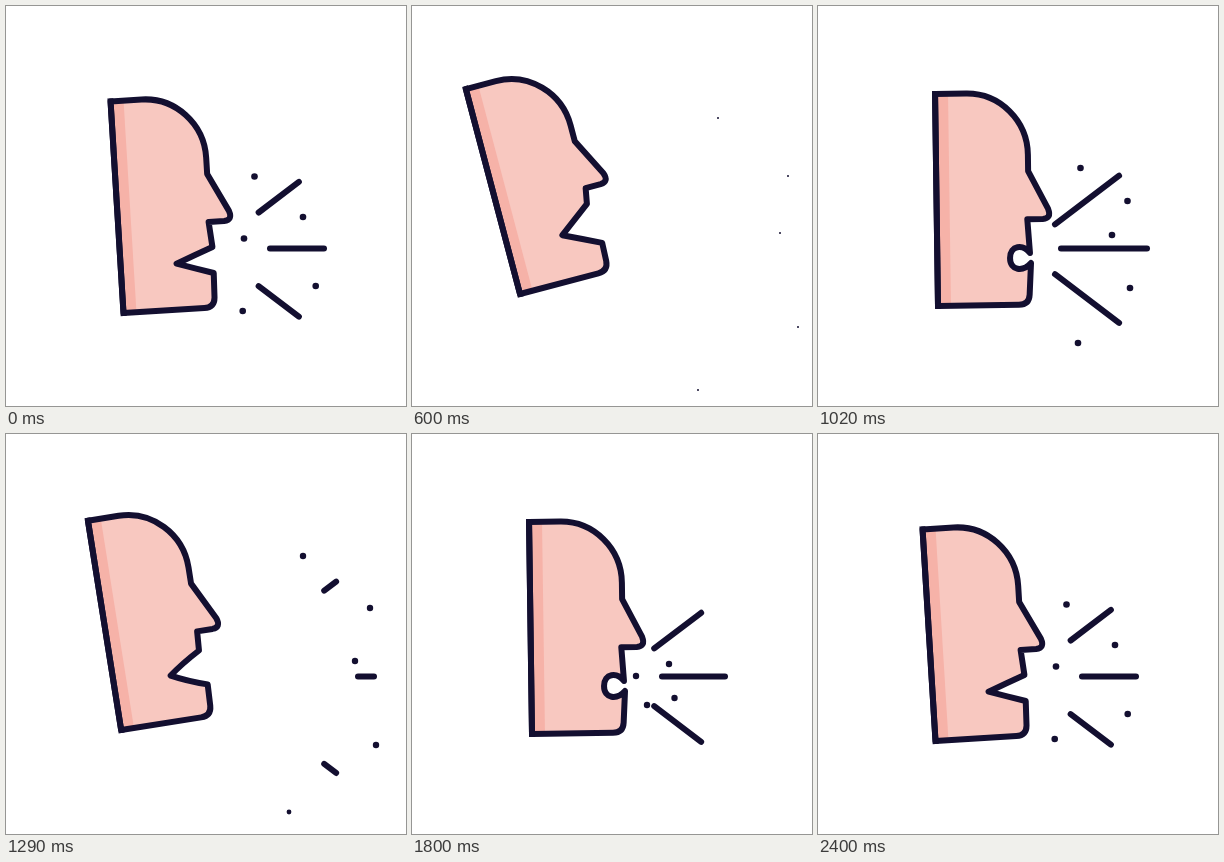
Animation, 400 px wide and 400 px high, one loop 2430 ms. Source, as an HTML page:

```html
<!DOCTYPE html>
<html lang="en">
<head>
<meta charset="utf-8">
<title>Talking head</title>
<style>
  html, body { margin: 0; width: 100%; height: 100%; overflow: hidden; background: #fff; }
  svg { display: block; width: 100vw; height: 100vh; }
  .ink { fill: none; stroke: #130f30; stroke-width: 6; stroke-linejoin: round; stroke-linecap: round; }
</style>
</head>
<body>
<svg viewBox="0 0 400 400">
  <g id="dots" fill="#130f30"></g>
  <g id="rays" class="ink"></g>
  <g id="head">
    <path id="skin" fill="#f8c8c0"/>
    <path fill="#f6b2a8" d="M0 0V-212H13V0Z"/>
    <path id="outline" class="ink"/>
    <path class="ink" d="M0 0V-212" style="stroke-linecap:square"/>
  </g>
</svg>
<script>
const LOOP = 2430, STEP = 30;
const $ = id => document.getElementById(id);

const lin = k => k;
const smooth = k => k * k * (3 - 2 * k);
const settle = k => smooth(1 - (1 - k) ** 1.7);
const out = k => 1 - (1 - k) ** 2;
const accel = k => k ** 1.6;

const mix = (a, b, k) => a.map((v, i) => v + (b[i] - v) * k);

// Rows are [time, values, easing towards the next row].
function at(track, t) {
  let i = track.length - 1;
  while (i > 0 && track[i][0] > t) i--;
  const [t0, a, ease = lin] = track[i], next = track[i + 1];
  return next ? mix(a, next[1], ease((t - t0) / (next[0] - t0))) : a;
}

// Mouth: upper lip, two controls, corner, two controls, lower lip.
function open(ux, uy, ly) {
  const up = [ux, uy], corner = [56, -46], low = [92.5, ly];
  return [up, mix(up, corner, 1 / 3), mix(up, corner, 2 / 3), corner,
    mix(corner, low, 1 / 3), mix(corner, low, 2 / 3), low].flat();
}
const shut = [92.7, -51.7, 85.9, -60.8, 72.9, -60, 72.7, -47, 72.5, -34, 85.5, -32.8, 93.6, -41.7];

// Head: neck x, neck y, tilt, mouth.
const rest = [117.5, 307, -3.5, ...open(92.8, -60.5, -34.4)];
const back = [108, 288, -14.8, ...open(87.7, -70, -28.4)];
const nod = [114.7, 295.7, -9.8, ...open(89, -67.8, -30.6)];
const closed = [120, 300, -0.8, ...shut];
const headTrack = [
  [0, rest, settle], [570, back], [600, back, smooth], [1020, closed, smooth],
  [1350, nod], [1380, nod, smooth], [1800, closed, settle], [2250, rest]
];

// Start and end of each stroke, measured along the middle ray.
const rayTrack = [
  [0, [264, 318], accel], [240, [266, 329]], [510, [352, 368]], [550, [374, 374]],
  [850, [236, 236], out], [1020, [243, 329]], [1290, [352, 368]], [1330, [374, 374]],
  [1680, [238, 238]], [1800, [250, 313], out], [1950, [285, 382], smooth], [2130, [264, 318]]
];

// Each dot: rest, drifting, second burst, far, gone, third burst.
const dotSpots = [
  [[248.5, 170.5], [254, 165], [262.5, 162], [297, 122], [306, 112], [220, 206]],
  [[297, 211], [304.5, 207.5], [309.5, 195], [364, 174], [376, 170], [257, 230]],
  [[238, 232.5], [250, 232], [294, 229], [349, 227], [368, 227], [224, 242]],
  [[309.7, 280], [317.5, 282], [312, 282], [370, 311], [386, 321], [262.5, 264]],
  [[236.7, 305], [241, 312], [260, 337], [283, 378], [286, 384], [235, 271]]
];
const dotTracks = dotSpots.map(([home, drift, second, far, end, third], i) => {
  const p = (xy, r) => [...xy, r], mouth = [204, 252, 0];
  const farR = i === 4 ? 2.4 : 3.2;
  return [
    [0, p(home, 3.3), accel], [240, p(drift, 3.2)], [510, p(far, farR), out],
    [600, p(end, 1)], [630, p(end, 0)], [860, mouth, out],
    [1020, p(second, 3.3)], [1290, p(far, farR), out], [1380, p(end, 1)], [1410, p(end, 0)],
    [1700, mouth], [1800, p(third, 3.2), out],
    [1980, p(mix(home, end, 0.2), 3.3), settle], [2300, p(home, 3.3)]
  ];
});

function add(parent, tag) {
  const el = document.createElementNS("http://www.w3.org/2000/svg", tag);
  return parent.appendChild(el);
}
const dots = dotTracks.map(() => add($("dots"), "circle"));
const rays = [-1, 0, 1].map(() => add($("rays"), "path"));

function rayPoint(side, m) {
  if (!side) return `${m} 242.5`;
  const d = (m - 243) * 0.745;
  return `${237 + d} ${243.3 + side * (24.9 + 0.76 * d)}`;
}

function drawHead(t) {
  const [x, y, tilt, ...m] = at(headTrack, t);
  const d = "M0 0V-212H31A61 62 0 0 1 92 -150V-133.7L111.5 -95.5Q115 -86 106 -85.6H90.5" +
    `L${m.slice(0, 2)}C${m.slice(2, 8)}C${m.slice(8)}L91.8 -10Q91.2 0 81 0Z`;
  $("skin").setAttribute("d", d);
  $("outline").setAttribute("d", d);
  $("head").setAttribute("transform", `translate(${x} ${y}) rotate(${tilt})`);
}

function draw(t) {
  drawHead(t);
  const [s, e] = at(rayTrack, t);
  rays.forEach((ray, i) => {
    ray.setAttribute("d", e - s < 1 ? "" : `M${rayPoint(i - 1, s)}L${rayPoint(i - 1, e)}`);
  });
  dots.forEach((dot, i) => {
    const [x, y, r] = at(dotTracks[i], t);
    dot.setAttribute("cx", x);
    dot.setAttribute("cy", y);
    dot.setAttribute("r", r);
  });
}

const begin = performance.now();
function tick() {
  const t = Math.max(0, performance.now() - begin) % LOOP;
  draw(Math.floor(t / STEP) * STEP);
  requestAnimationFrame(tick);
}
tick();
</script>
</body>
</html>
```
